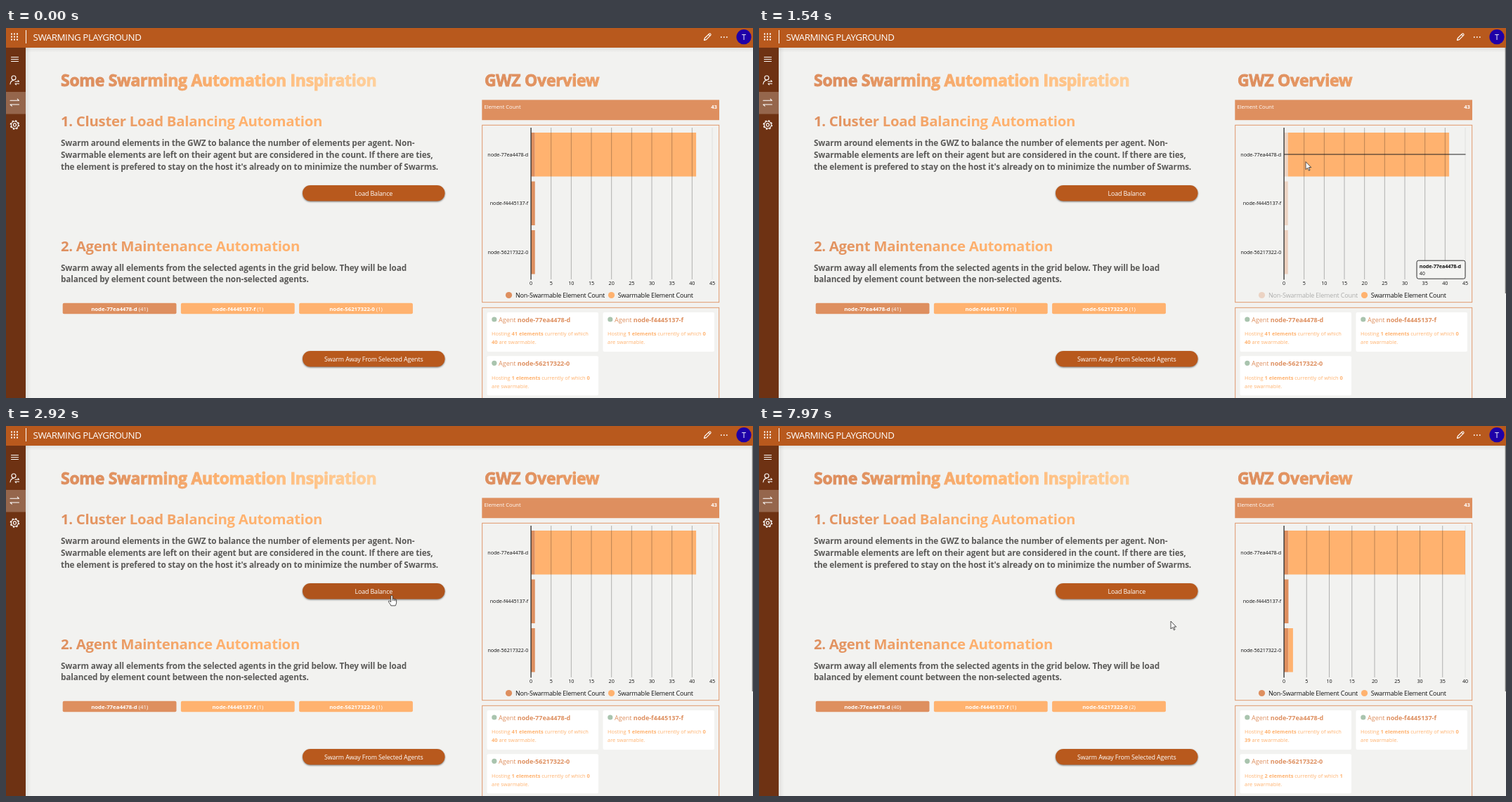
Recreate the animation shown at these times as an HTML page. Size 1063 by 527 pixels, loop 8 s.

```html
<!DOCTYPE html>
<html lang="en">
<head>
<meta charset="utf-8">
<title>Swarming Playground</title>
<style>
  html, body { margin: 0; width: 100%; height: 100%; overflow: hidden; background: #f2f2f0; }
  svg { display: block; width: 1063px; height: 527px; font-family: "Open Sans", "Noto Sans", sans-serif; }
  .h1 { font: 700 23px "Open Sans", "Noto Sans", sans-serif; letter-spacing: -.28px; stroke-width: .9; }
  .h2 { font: 700 20.4px "Open Sans", "Noto Sans", sans-serif; letter-spacing: -.3px; }
  .body { font-size: 11.75px; font-weight: 700; letter-spacing: -.13px; fill: #5b5a58; }
  .label { font-size: 8.9px; letter-spacing: -.13px; fill: #fff; text-anchor: middle; }
  .pill { font-size: 7.8px; fill: #fff; text-anchor: middle; }
  .small { font-size: 7.2px; letter-spacing: -.07px; fill: #111; }
  .legend { font-size: 9px; letter-spacing: -.18px; fill: #111; }
  .agent { font-size: 9px; fill: #de8f5f; }
  .host { font-size: 7.45px; fill: #ffb26f; }
  .b { font-weight: 700; }
  .btn { fill: #b8591d; filter: drop-shadow(0 1.5px 1.2px rgba(0, 0, 0, .5)); }
  .icon { fill: none; stroke: #fff; stroke-width: 1.1; stroke-linecap: round; stroke-linejoin: round; }
</style>
</head>
<body>
<svg id="stage" viewBox="0 0 1063 527">
  <defs>
    <linearGradient id="wide" gradientUnits="userSpaceOnUse" x1="78" x2="620">
      <stop offset=".1" stop-color="#de8f5f"/><stop offset=".45" stop-color="#ffb572"/><stop offset="1" stop-color="#ffdcae"/>
    </linearGradient>
    <linearGradient id="head" gradientUnits="userSpaceOnUse" x1="78" x2="320">
      <stop offset="0" stop-color="#de8f5f"/><stop offset="1" stop-color="#ffb26f"/>
    </linearGradient>
    <linearGradient id="side" gradientUnits="userSpaceOnUse" x1="681" x2="1015">
      <stop offset=".1" stop-color="#de8f5f"/><stop offset="1" stop-color="#ffb26f"/>
    </linearGradient>
    <linearGradient id="shade">
      <stop offset="0" stop-opacity=".07"/><stop offset="1" stop-opacity="0"/>
    </linearGradient>
    <linearGradient id="shadeDown" href="#shade" x2="0" y2="1"/>
    <clipPath id="btnClip"><rect x="422" y="224" width="202.5" height="22.5" rx="11.2"/></clipPath>
  </defs>

  <rect width="1063" height="527" fill="#f2f2f0"/>
  <rect x="28" y="28" width="8" height="499" fill="url(#shade)"/>
  <rect x="28" y="28" width="1035" height="7" fill="url(#shadeDown)"/>

  <!-- header -->
  <rect width="1063" height="28" fill="#b8591d"/>
  <g id="dots" fill="#fff"></g>
  <rect x="28" y="3" width="1" height="19" fill="#fff"/>
  <text x="38.5" y="17.8" fill="#fff" font-size="13.3" letter-spacing="-.42">SWARMING PLAYGROUND</text>
  <path class="icon" d="M993.5 17.5l.8-3 6.4-6.4q1-.7 1.9.2t.2 1.9l-6.4 6.4zM999.6 9.2l2.2 2.2"/>
  <g fill="#fff"><circle cx="1017.8" cy="13" r=".9"/><circle cx="1021.8" cy="13" r=".9"/><circle cx="1025.8" cy="13" r=".9"/></g>
  <circle cx="1050" cy="12.7" r="10.6" fill="#1f00a8"/>
  <text x="1050" y="16.7" fill="#fff" font-size="11" text-anchor="middle">T</text>

  <!-- sidebar -->
  <rect y="28" width="28" height="499" fill="#6e3213"/>
  <rect y="91" width="28" height="31.5" fill="#95664c"/>
  <path class="icon" stroke-width=".9" d="M7.5 41.5h10M7.5 44.5h10M7.5 47.5h10"/>
  <g class="icon">
    <circle cx="11" cy="71" r="3"/>
    <path d="M6 80q.5-5 5-5.6M13 76.2h5.5l-1.5-1.5M18.5 79.3H13l1.5 1.5"/>
    <path d="M6 103.3h12.5l-2.3-2.2M18.5 109H6l2.3 2.2"/>
    <circle cx="12.4" cy="138" r="2.1"/>
    <circle cx="12.4" cy="138" r="5"/>
    <circle cx="12.4" cy="138" r="6.1" stroke-width="1.4" stroke-linecap="butt" stroke-dasharray="2.4 2.39"/>
  </g>

  <!-- left column -->
  <text class="h1" x="78" y="83" fill="url(#wide)" stroke="url(#wide)">Some Swarming Automation Inspiration</text>
  <text class="h2" x="78" y="140" fill="url(#head)">1. Cluster Load Balancing Automation</text>
  <g class="body">
    <text x="78" y="168.4">Swarm around elements in the GWZ to balance the number of elements per agent. Non-</text>
    <text x="78" y="185">Swarmable elements are left on their agent but are considered in the count. If there are ties,</text>
    <text x="78" y="201.6">the element is prefered to stay on the host it's already on to minimize the number of Swarms.</text>
    <text x="78" y="345.5">Swarm away all elements from the selected agents in the grid below. They will be load</text>
    <text x="78" y="362.1">balanced by element count between the non-selected agents.</text>
  </g>
  <rect class="btn" x="422" y="224" width="202.5" height="22.5" rx="11.2"/>
  <g clip-path="url(#btnClip)">
    <rect id="hover" x="422" y="224" width="203" height="23" opacity="0"/>
    <circle id="ripple" cx="549" cy="241" r="0" opacity=".06"/>
  </g>
  <text class="label" x="523.3" y="238.7">Load Balance</text>
  <text class="h2" x="78" y="317.5" fill="url(#head)">2. Agent Maintenance Automation</text>
  <g id="pills"></g>
  <rect class="btn" x="422" y="460" width="202.5" height="22.5" rx="11.2"/>
  <text class="label" x="523.3" y="475">Swarm Away From Selected Agents</text>

  <!-- right column -->
  <text class="h1" x="681" y="83" fill="url(#side)" stroke="url(#side)">GWZ Overview</text>
  <rect x="677.3" y="102.4" width="337.7" height="28.8" fill="#de8f5f"/>
  <text x="680.5" y="115" fill="#fff" font-size="7.55">Element Count</text>
  <text class="b" x="1012" y="115" fill="#fff" font-size="7.7" text-anchor="end">43</text>
  <rect x="677.7" y="138.3" width="337" height="252.4" fill="none" stroke="#de8f5f" stroke-width=".9"/>
  <rect x="677.7" y="398.3" width="337" height="140" fill="none" stroke="#de8f5f" stroke-width=".9"/>
  <g id="bars"></g>
  <g id="ticks"></g>
  <rect x="746.5" y="142" width="1.2" height="216.5" fill="#333"/>
  <rect id="cross" x="747" width="258.5" height="1" fill="#222"/>
  <g id="legend1"><circle cx="715.5" cy="380.5" r="4.6" fill="#de8f5f"/><text class="legend" x="725" y="384">Non-Swarmable Element Count</text></g>
  <circle cx="861.5" cy="380.5" r="4.6" fill="#ffb26f"/><text class="legend" x="870.7" y="384">Swarmable Element Count</text>
  <g id="tip">
    <rect x="936" y="331.2" width="69" height="26" rx="2.5" fill="#f4f4f2" stroke="#333"/>
    <text class="small b" x="939.8" y="341.5">node-77ea4478-d</text>
    <text class="small" x="939.8" y="352">40</text>
  </g>
  <g id="cards"></g>
  <rect id="scroll" x="1061.7" y="28" width="1.3" height="350" fill="#777"/>

  <g id="arrow"><path d="M0 0V11L2.6 8.7 4.4 12.6 6 11.9 4.3 8.1H7.8Z" fill="#fff" stroke="#222" stroke-width=".8"/></g>
  <g id="hand"><path d="M-1.3 1q1.3-1.9 2.5 0v4.2q1.2-.8 2 .4 1.2-.6 1.8.5 1.4-.4 1.6 1v3.6q-.2 2-1.4 4.2H-1.2Q-2.2 12.4-4.6 9.6q-.4-1.9 1.4-1.4l1.9 1.4zM1.2 5.2v2.6M3.2 5.7v2.3M5 6.2v2.2" fill="#fff" stroke="#222" stroke-width=".8" stroke-linejoin="round"/></g>
</svg>
<script>
const LOOP = 8000, X0 = 747, PLOT = 258;
const DARK = '#de8f5f', LIGHT = '#ffb26f';
const names = ['node-77ea4478-d', 'node-f4445137-f', 'node-56217322-0'];
const rowTop = [149, 218.5, 288];
const $ = id => document.getElementById(id);

function add(parent, tag, attrs = {}, text) {
  const el = document.createElementNS('http://www.w3.org/2000/svg', tag);
  for (const k in attrs) el.setAttribute(k, attrs[k]);
  if (text !== undefined) el.textContent = text;
  parent.appendChild(el);
  return el;
}
const set = (el, attrs) => { for (const k in attrs) el.setAttribute(k, attrs[k]); };
const show = (el, on) => el.setAttribute('visibility', on ? 'visible' : 'hidden');

// piecewise linear value over [time, value] pairs
function track(keys, t) {
  if (t <= keys[0][0]) return keys[0][1];
  for (let i = 1; i < keys.length; i++) {
    const [a, u] = keys[i - 1], [b, v] = keys[i];
    if (t < b) return u + (v - u) * (t - a) / (b - a);
  }
  return keys[keys.length - 1][1];
}

for (let i = 0; i < 9; i++)
  add($('dots'), 'rect', { x: 7 + i % 3 * 4, y: 7.5 + Math.floor(i / 3) * 4, width: 2, height: 2 });

const pills = names.map((name, i) => {
  const x = 80.7 + i * 168.2;
  add($('pills'), 'rect', { x, y: 391.7, width: 161.8, height: 15.6, rx: 2, fill: i ? LIGHT : DARK });
  const text = add($('pills'), 'text', { class: 'pill', x: x + 81, y: 402.7 });
  add(text, 'tspan', { class: 'b' }, name);
  return add(text, 'tspan');
});

const cards = names.map((name, i) => {
  const x = i === 1 ? 849.5 : 684.5, y = i === 2 ? 467.3 : 405, g = $('cards');
  add(g, 'rect', { x, y, width: 158.5, height: 56, rx: 2, fill: '#fff' });
  add(g, 'circle', { cx: x + 10.3, cy: y + 10, r: 3.6, fill: '#a9c4ae' });
  const title = add(g, 'text', { class: 'agent', x: x + 16.5, y: y + 13.5 }, 'Agent ');
  add(title, 'tspan', { class: 'b' }, name);
  const line1 = add(g, 'text', { class: 'host', x: x + 6.5, y: y + 33.2 }, 'Hosting ');
  const total = add(line1, 'tspan', { class: 'b' });
  add(line1, 'tspan', {}, ' currently of which ');
  const free1 = add(line1, 'tspan', { class: 'b' });
  const line2 = add(g, 'text', { class: 'host', x: x + 6.5, y: y + 45.2 });
  const free2 = add(line2, 'tspan', { class: 'b' });
  add(line2, 'tspan', {}, i ? 'are swarmable.' : ' are swarmable.');
  return { total, free: i ? free1 : free2 };
});

const bars = names.map((name, i) => {
  const box = { y: rowTop[i], height: 62.5 };
  add($('bars'), 'text', { class: 'small', x: 743.2, y: rowTop[i] + 33.7, 'text-anchor': 'end' }, name);
  return [DARK, LIGHT].map(fill => add($('bars'), 'rect', { ...box, fill }));
});

const ticks = Array.from({ length: 10 }, (_, i) => ({
  line: add($('ticks'), 'rect', { y: 142, width: 1, height: 216, opacity: .27 }),
  label: add($('ticks'), 'text', { class: 'small', y: 366, 'text-anchor': 'middle' }, i * 5)
}));

const pathX = [[780, 835], [1120, 805], [1540, 778], [2010, 777.5], [2150, 766], [2290, 742], [2430, 649],
  [2710, 580], [2780, 561], [2850, 552], [2920, 549], [7620, 549], [7970, 586]];
const pathY = [[780, 437], [1120, 312], [1540, 190.5], [2010, 190], [2150, 222], [2290, 246], [2430, 263.3],
  [2710, 250], [2780, 244], [2850, 242], [2920, 241], [7620, 241], [7970, 278]];

const fade = {
  dark: [
    [[1000, 1], [1220, .4], [1540, .3], [2430, .35], [2640, 1]],
    [[1000, 1], [1220, .5], [1320, 1], [1440, 1], [1540, .3], [2150, .3], [2290, 1]],
    [[1220, 1], [1420, .35], [2430, .35], [2640, 1]]
  ],
  light: [[1000, 1], [1220, .4], [1440, .4], [1540, 1], [2150, 1], [2290, .4], [2430, .4], [2640, 1]],
  legend: [[1440, 1], [1540, .3], [2080, .3], [2220, 1]]
};

const marks = [0, 780, 1120, 1540, 2010, 3530, 3870, 6870, 7620];
function stepped(t) {
  const start = marks.filter(m => m <= t).pop();
  return start + Math.floor((t - start) / 70) * 70;
}

function drawChart(t) {
  const p = track([[6940, 0], [7150, 1]], t), ease = 1 - (1 - p) ** 3;
  const max = 45 - 5 * ease, unit = PLOT / max;
  const free = [40 - ease, 0, ease];
  bars.forEach(([dark, light], i) => {
    const alpha = track(fade.dark[i], t);
    set(dark, { x: X0, width: unit, opacity: alpha });
    set(light, { x: X0 + unit, width: free[i] * unit, opacity: i ? alpha : track(fade.light, t) });
  });
  ticks.forEach(({ line, label }, i) => {
    const x = X0 + i * 5 * unit, on = i < 9 || p === 0;
    set(line, { x: x - .5, opacity: i * 5 >= max - .01 ? .07 : .27 });
    set(label, { x });
    show(line, on);
    show(label, on);
  });
}

function drawCounts(t) {
  const totals = [t < 6940 ? 41 : 40, 1, t < 6870 ? 1 : 2];
  totals.forEach((n, i) => {
    pills[i].textContent = ` (${n})`;
    cards[i].total.textContent = `${n} elements`;
    cards[i].free.textContent = n - 1;
  });
}

function drawPointer(t) {
  const x = track(pathX, t), y = track(pathY, t), on = t >= 780;
  const overButton = on && x > 422 && x < 624 && y > 224 && y < 247;
  const inPlot = on && x >= X0 && x <= X0 + PLOT && y > 142 && y < 358;
  const row = y < 215 ? 0 : y < 284.5 ? 1 : 2;
  for (const id of ['arrow', 'hand']) {
    set($(id), { transform: `translate(${x} ${y})` });
    show($(id), on && (id === 'hand') === overButton);
  }
  set($('cross'), { y: rowTop[row] + 30.5 });
  show($('cross'), inPlot);
  show($('tip'), inPlot && row === 0 && t >= 1470);
  show($('scroll'), on);
  set($('legend1'), { opacity: track(fade.legend, t) });
  set($('hover'), { opacity: track([[2710, 0], [2850, .05], [7690, .05], [7830, 0]], t) });
  set($('ripple'), {
    r: track([[3460, 0], [3870, 132]], t),
    opacity: track([[7620, .06], [7830, 0]], t)
  });
}

function frame() {
  const t = stepped(performance.now() % LOOP);
  drawChart(t);
  drawCounts(t);
  drawPointer(t);
  requestAnimationFrame(frame);
}
frame();
</script>
</body>
</html>
```
